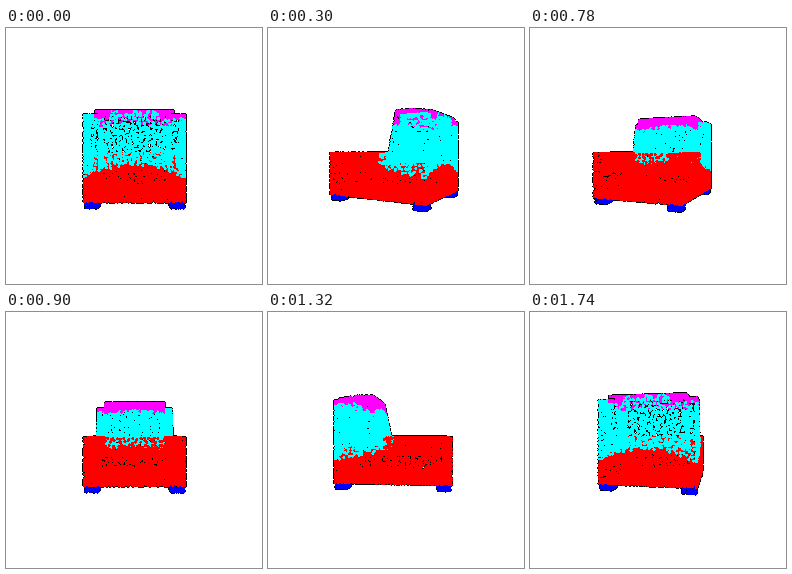
Recreate the animation shown at these times as a matplotlib script. Size 256 by 256 pixels, loop 1.8 s.

```python
import numpy as np
import matplotlib.pyplot as plt
from matplotlib.animation import FuncAnimation

SIZE, FRAMES, INTERVAL = 256, 30, 60
CX, CY = 128.2, 122.6        # rotation axis and horizon on the stage
CAMERA = 250                 # distance from the eye to the axis
CORE, RIM, STEP = 1.55, 2.2, 3.0   # ball radii and spacing of the cloud
W, D = 40.4, 49              # half width and half depth of the chair
IN, SEAT, ARM, BASE, WING = 31, 17, 2.5, 40.5, -28.8

PALETTE = np.array([(255, 0, 0), (0, 255, 255), (255, 0, 255),
                    (0, 0, 255)], dtype=np.uint8)
RED, CYAN, MAGENTA, BLUE = range(4)

rng = np.random.default_rng(7)


def quad(a, b, c, d):
    """Jittered points on the patch a-b-c-d; a point is (x, down, z)."""
    a, b, c, d = (np.array(p, float) for p in (a, b, c, d))
    nu = max(2, round(max(np.linalg.norm(b - a), np.linalg.norm(c - d)) / STEP) + 1)
    nv = max(2, round(max(np.linalg.norm(d - a), np.linalg.norm(c - b)) / STEP) + 1)
    u, v = np.meshgrid(np.linspace(0, 1, nu), np.linspace(0, 1, nv))
    u = np.clip(u + rng.uniform(-.4, .4, u.shape) / (nu - 1), 0, 1).reshape(-1, 1)
    v = np.clip(v + rng.uniform(-.4, .4, v.shape) / (nv - 1), 0, 1).reshape(-1, 1)
    return (1 - v) * ((1 - u) * a + u * b) + v * ((1 - u) * d + u * c)


def side(x, *zh):
    return quad(*[(x, h, z) for z, h in zh])


def wall(z, x0, x1, h0, h1):
    return quad((x0, h0, z), (x1, h0, z), (x1, h1, z), (x0, h1, z))


def slab(x0, x1, z0, z1, h0, h1=None):
    h1 = h0 if h1 is None else h1
    return quad((x0, h0, z0), (x1, h0, z0), (x1, h1, z1), (x0, h1, z1))


def body():
    parts = [
        wall(-D, -W, W, ARM, BASE),
        wall(D, -W, W, WING, BASE),
        wall(D, -29, 29, -32, WING),
        slab(-W, W, -D, D, BASE),
        slab(-IN, IN, -D, 6, SEAT),
        slab(-IN, IN, 18, 32, -34.3),
        slab(-IN, IN, 32, D, -34.3, -32),
        slab(-IN, IN, 18, 7, -34, SEAT),
    ]
    for s in (-1, 1):
        parts += [
            side(s * W, (-D, ARM), (D, ARM), (D, BASE), (-D, BASE)),
            side(s * W, (28, WING), (D, WING), (D, ARM), (22, ARM)),
            side(s * IN, (-D, ARM), (8, ARM), (8, SEAT), (-D, SEAT)),
            side(s * IN, (18, -34), (32, -34), (32, SEAT), (7, SEAT)),
            wall(28, s * IN, s * W, WING, ARM),
            slab(s * IN, s * W, -D, 28, ARM),
            slab(s * IN, s * W, 28, D, WING),
        ]
    return np.vstack(parts)


def feet():
    parts = []
    for sx in (-1, 1):
        for sz in (-1, 1):
            x0, x1, z0, z1 = sx * 30, sx * 39.5, sz * 39, sz * 48
            parts += [wall(z, x0, x1, 42, 45.5) for z in (z0, z1)]
            parts += [side(x, (z0, 42), (z1, 42), (z1, 45.5), (z0, 45.5))
                      for x in (x0, x1)]
            parts.append(slab(x0, x1, z0, z1, 45.5))
    return np.vstack(parts)


def classify(p):
    x, h, z = p.T
    kind = np.full(len(p), RED)
    edge = 12 + 10 * (x / W) ** 2 * np.clip(z, 0, D) / D
    kind[(z > 6.5) & (h < edge + rng.normal(0, .8, len(p)))] = CYAN

    rest = (z < 34) & (np.abs(x) < 32)
    top = np.where(rest, -26 + 4 * (x / IN) ** 4,
                   np.where(np.abs(x) < 20, -31.5, -26.5))
    top = top + rng.normal(0, .7, len(p))
    kind[(z > 10) & (x > -33) & (h < top)] = MAGENTA
    return kind


shell, legs = body(), feet()
cloud = np.vstack([shell, legs])
kinds = np.concatenate([classify(shell), np.full(len(legs), BLUE)])
reach = np.arange(-2, 3)
OX, OY = (g.ravel() for g in np.meshgrid(reach, reach))


def render(i):
    t = 2 * np.pi * i / FRAMES
    x, h, z = cloud.T
    near = z * np.cos(t) - x * np.sin(t)
    scale = CAMERA / (CAMERA - near)
    sx = CX + scale * (x * np.cos(t) + z * np.sin(t))
    sy = CY + scale * h

    px = np.rint(sx).astype(int)[:, None] + OX
    py = np.rint(sy).astype(int)[:, None] + OY
    d2 = (px - sx[:, None]) ** 2 + (py - sy[:, None]) ** 2
    depth = near[:, None] + np.sqrt(np.maximum(CORE ** 2 - d2, 0))
    color = np.broadcast_to(kinds[:, None], d2.shape)

    # dark rims lie beneath every core, so they show only in gaps and outlines
    img = np.full((SIZE, SIZE, 3), 255, np.uint8)
    rim, core = d2 < RIM ** 2, d2 < CORE ** 2
    img[py[rim], px[rim]] = 0
    order = np.argsort(depth[core])
    img[py[core][order], px[core][order]] = PALETTE[color[core][order]]
    return img


fig = plt.figure(figsize=(SIZE / 100, SIZE / 100), dpi=100, facecolor="white")
ax = fig.add_axes([0, 0, 1, 1])
ax.axis("off")
picture = ax.imshow(render(0), interpolation="nearest", aspect="auto")


def update(i):
    picture.set_data(render(i))
    return [picture]


anim = FuncAnimation(fig, update, frames=FRAMES, interval=INTERVAL,
                     repeat=True, repeat_delay=0, blit=False)
plt.show()
```
